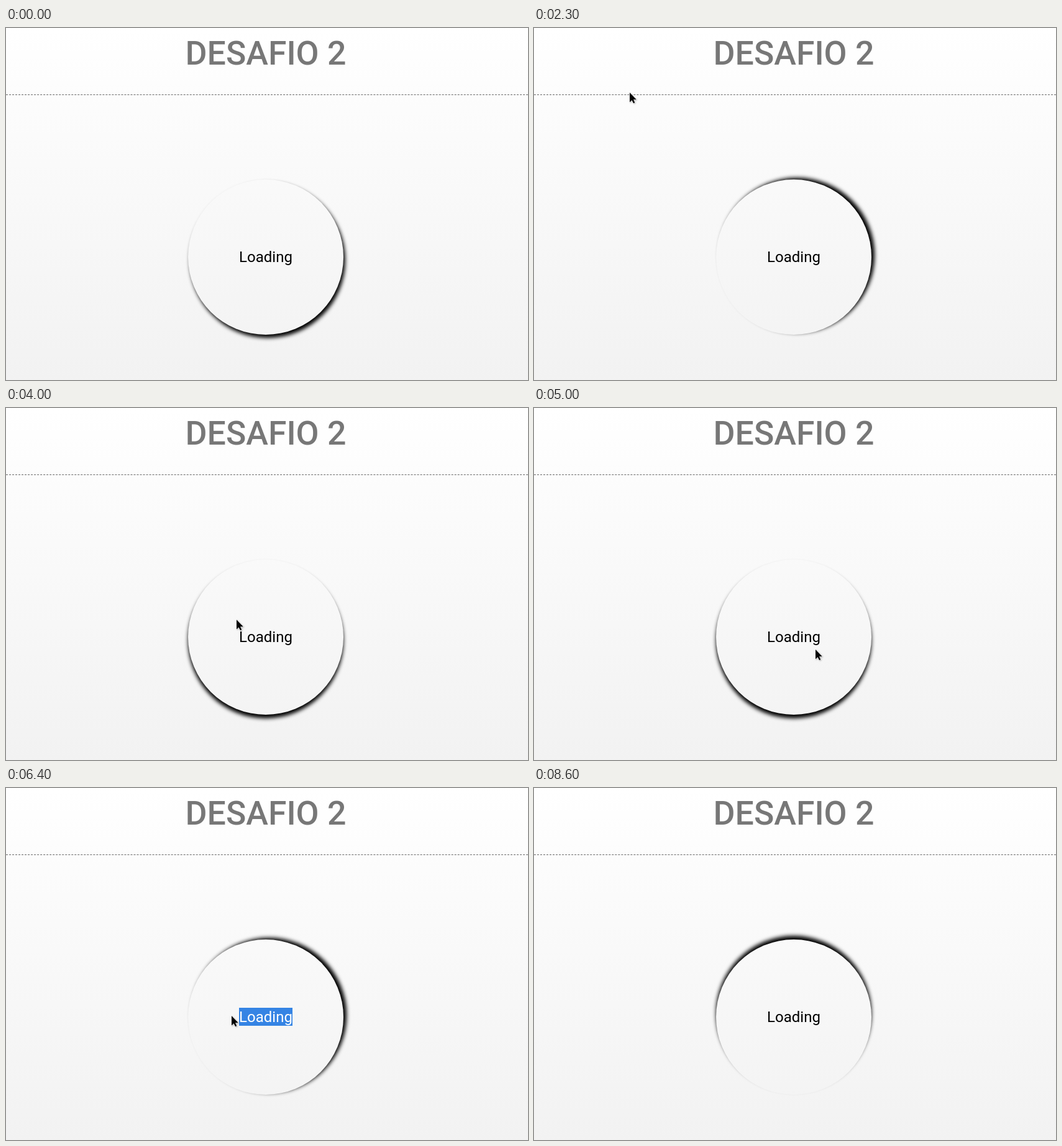
Animation, 840 px wide and 567 px high, one loop 8700 ms. Source, as an HTML page:

```html
<!DOCTYPE html>
<html lang="pt">
<head>
<meta charset="utf-8">
<title>Desafio 2</title>
<style>
  html, body { margin: 0; width: 100%; height: 100%; overflow: hidden; }
  #stage {
    position: relative; width: 840px; height: 567px; overflow: hidden;
    background: linear-gradient(#fff, #f2f2f2);
    font-family: Roboto, sans-serif;
  }
  h1 {
    position: absolute; top: 9px; width: 836px; margin: 0; text-align: center;
    font-size: 53.6px; line-height: 63px; font-weight: 500; color: #777;
  }
  #rule { position: absolute; top: 107px; width: 100%; border-top: 1px dashed #696969; }
  #ring {
    position: absolute; left: 293px; top: 244px;
    width: 250px; height: 250px; border-radius: 50%;
    display: flex; align-items: center; justify-content: center;
    font-size: 24px;
  }
  #picked { background: #3584e4; color: #fff; padding-top: 1px; }
  #cursor { position: absolute; left: 0; top: 0; overflow: visible; }
</style>
</head>
<body>
<div id="stage">
  <h1>DESAFIO 2</h1>
  <div id="rule"></div>
  <div id="ring"><div><span id="plain">Loading</span><span id="picked"></span></div></div>
  <svg id="cursor" width="12" height="18">
    <path d="M0 0V15.5L3.6 12.2L6 17.2L8.3 16.2L6 11.3H10.8Z"
      stroke="#fff" stroke-width="1" paint-order="stroke"
      style="filter: drop-shadow(1px 1px 1px #0004)"/>
  </svg>
</div>
<script>
const LOOP = 8700, STEP = 100, TURN = 1000, HOLD = 2500;
const RADIUS = 6, WORD = 'Loading';
const byId = id => document.getElementById(id);
const ring = byId('ring'), plain = byId('plain'), picked = byId('picked'), cursor = byId('cursor');

const clamp = k => Math.min(1, Math.max(0, k));
const easeOut = k => k * (2 - k);
const easeInOut = k => (1 - Math.cos(Math.PI * k)) / 2;

const entry = { x: 59, y: 0 };
const drag = { at: 5300, lasts: 800, x: 363, y: 367, ease: easeInOut };
const moves = [
  { at: 2200, lasts: 600, x: 371, y: 341, ease: easeOut },
  { at: 4100, lasts: 700, x: 453, y: 389, ease: easeInOut },
  drag,
  { at: 7000, lasts: 500, x: 80, y: 0, ease: easeInOut }
];
const exit = moves.at(-1);
const progress = (move, t) => move.ease(clamp((t - move.at) / move.lasts));

// The shadow swings up the right side steadily, then eases down the left side.
function shadowAngle(turn) {
  const degrees = turn < 0.6
    ? 90 - 300 * turn
    : -90 - 180 * easeInOut((turn - 0.6) / 0.4);
  return degrees * Math.PI / 180;
}

function pointer(t) {
  return moves.reduce((from, move) => {
    const k = progress(move, t);
    return { x: from.x + (move.x - from.x) * k, y: from.y + (move.y - from.y) * k };
  }, entry);
}

function draw(time) {
  // Everything pauses for one step.
  const t = time < HOLD ? time : time - STEP;

  const angle = shadowAngle(((t + STEP) % TURN) / TURN);
  ring.style.boxShadow =
    `${RADIUS * Math.cos(angle)}px ${RADIUS * Math.sin(angle)}px ${RADIUS}px #000`;

  const { x, y } = pointer(t);
  cursor.style.transform = `translate(${Math.round(x)}px, ${Math.round(y)}px)`;
  const visible = t >= moves[0].at && t < exit.at + exit.lasts;
  cursor.style.visibility = visible ? 'visible' : 'hidden';

  const count = t < exit.at - STEP ? Math.round(progress(drag, t) * WORD.length) : 0;
  const split = WORD.length - count;
  plain.textContent = WORD.slice(0, split);
  picked.textContent = WORD.slice(split);
}

const start = performance.now();
function frame() {
  const t = (performance.now() - start) % LOOP;
  draw(Math.floor(t / STEP) * STEP);
  requestAnimationFrame(frame);
}
frame();
</script>
</body>
</html>
```
